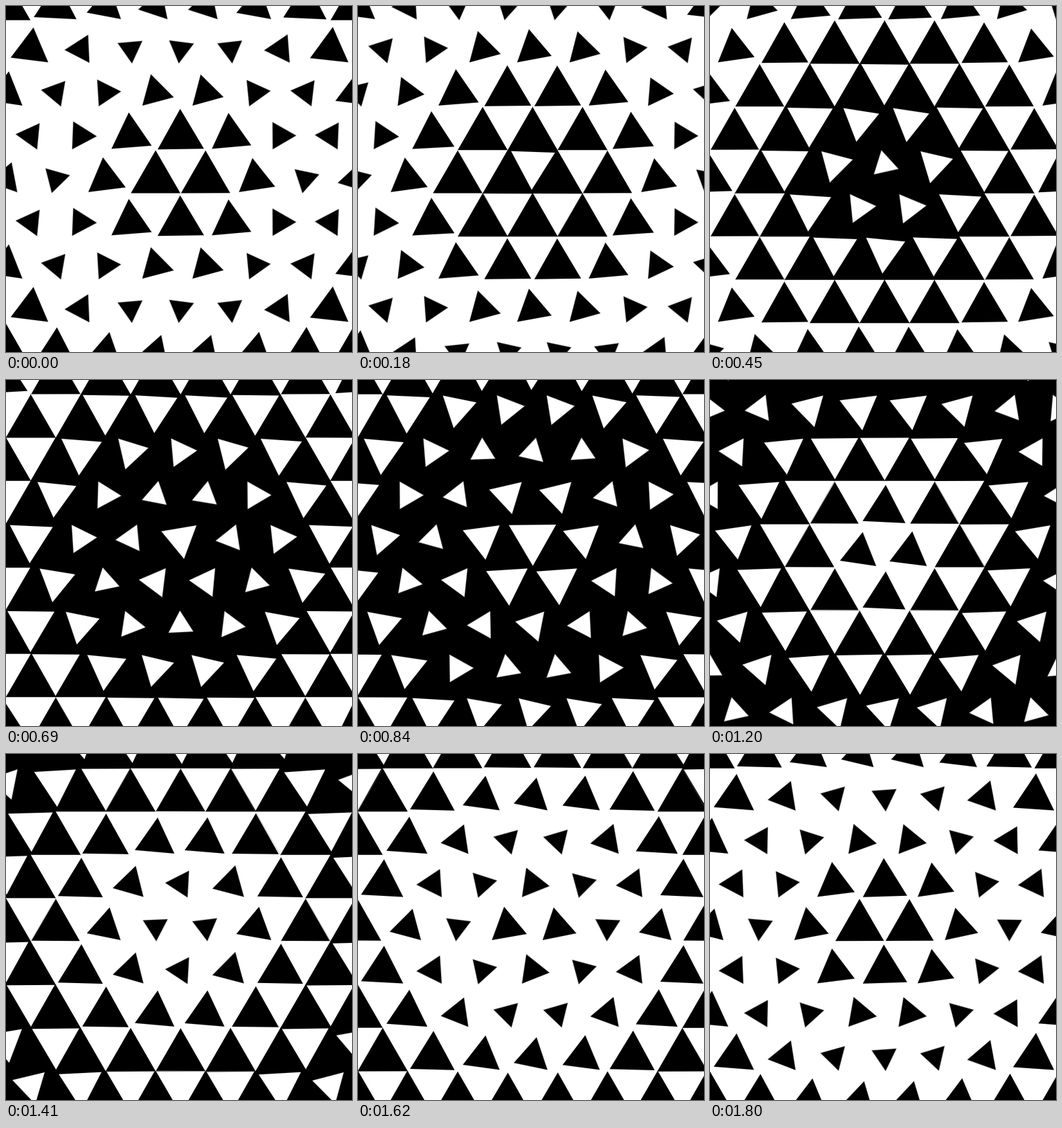
Animation of 500 by 500 pixels, one loop 1.83 s. Source, as an HTML page with a canvas:

```html
<!DOCTYPE html>
<html>
<head>
<meta charset="utf-8">
<title>Turning triangles</title>
<style>
html, body { margin: 0; width: 100%; height: 100%; overflow: hidden; background: #fff; }
canvas { display: block; }
</style>
</head>
<body>
<canvas id="stage" width="500" height="500"></canvas>
<script>
const ctx = document.getElementById('stage').getContext('2d');
const LOOP = 1830, STEP = 30, TURN = 900, WHITE_LAG = 930;
const ROW = 62.5, SIDE = ROW * 2 / Math.sqrt(3), RADIUS = ROW * 2 / 3;
const ORIGIN = { x: 252.3, y: 270.7 };
const SPEED = 0.39; // ripple speed, px per ms
const MIN_SCALE = 0.485;

const cells = [];
for (let row = -5; row <= 5; row++) {
  for (let col = -5; col <= 5; col++) {
    for (const up of [true, false]) {
      const shift = (row % 2 === 0) === up ? 0.5 : 0;
      const x = ORIGIN.x + (col + shift) * SIDE;
      const y = ORIGIN.y + row * ROW - ROW * (up ? 1 : 2) / 3;
      const dist = Math.hypot(x - 250, y - 250);
      const start = (dist - 195) / SPEED - TURN / 2 + (up ? 0 : WHITE_LAG);
      cells.push({ x, y, up, start });
    }
  }
}

const mod = (a, n) => ((a % n) + n) % n;
const cubicInOut = u => u < 0.5 ? 4 * u ** 3 : 1 - 4 * (1 - u) ** 3;

function triangle({ x, y, up }, color, scale = 1, angle = 0) {
  ctx.beginPath();
  for (let i = 0; i < 3; i++) {
    const a = angle + (up ? -1 : 1) * Math.PI / 2 + i * Math.PI * 2 / 3;
    ctx.lineTo(x + RADIUS * scale * Math.cos(a), y + RADIUS * scale * Math.sin(a));
  }
  ctx.closePath();
  ctx.fillStyle = ctx.strokeStyle = color;
  ctx.fill();
}

function draw(time) {
  ctx.fillStyle = '#fff';
  ctx.fillRect(0, 0, 500, 500);
  ctx.lineJoin = 'round';
  const white = [], moving = [];
  for (const cell of cells) {
    const u = mod(time - cell.start, LOOP) / TURN;
    const active = u < 1;
    if (active) moving.push([cell, u]);
    if (active === cell.up) {
      white.push(cell);
    } else {
      triangle(cell, '#000');
      ctx.lineWidth = 1.4; // closes the seams between neighbours
      ctx.stroke();
    }
  }
  for (const cell of white) triangle(cell, '#fff');
  for (const [cell, u] of moving) {
    const scale = 1 - (1 - MIN_SCALE) * (1 - Math.cos(2 * Math.PI * u)) / 2;
    const angle = cubicInOut(u) * Math.PI * 2 / 3;
    triangle(cell, cell.up ? '#000' : '#fff', scale, angle);
    // shrunken triangles have a softer edge
    ctx.lineWidth = 3 * (1 - scale);
    ctx.globalAlpha = 0.35;
    ctx.stroke();
    ctx.globalAlpha = 1;
  }
}

const begin = performance.now();
function frame() {
  const time = (performance.now() - begin) % LOOP;
  draw(Math.floor(time / STEP) * STEP);
  requestAnimationFrame(frame);
}
frame();
</script>
</body>
</html>
```
